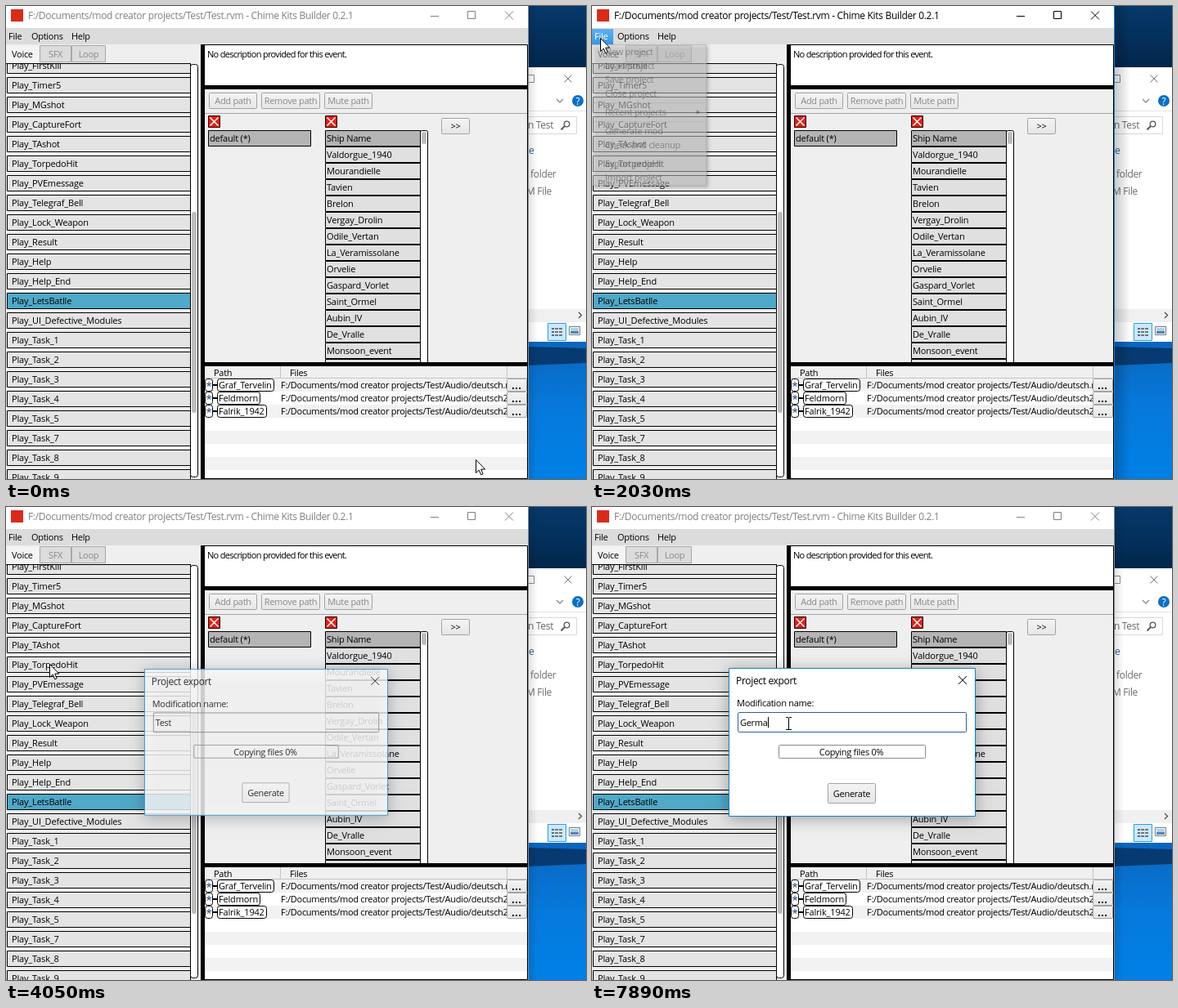
An HTML page with a canvas for the animation above (8 s loop, 709 by 579 pixels).

```html
<!DOCTYPE html>
<html lang="en">
<head>
<meta charset="utf-8">
<title>Project export</title>
<style>
html, body { margin: 0; width: 100%; height: 100%; overflow: hidden; background: #fff; }
canvas { display: block; }
</style>
</head>
<body>
<canvas id="stage" width="709" height="579"></canvas>
<script>
const ctx = document.getElementById('stage').getContext('2d');
const LOOP = 8000;
const FONT = '"Open Sans", "Noto Sans", sans-serif';

const STYLE = {
  ui: { size: 11, spacing: -0.28 },
  list: { size: 11, spacing: -0.18 },
  note: { size: 11, spacing: -0.68 },
  title: { size: 12, spacing: -0.32 },
  symbol: { size: 13, spacing: 0 }
};

const EVENTS = ['FirstKill', 'Timer5', 'MGshot', 'CaptureFort', 'TAshot', 'TorpedoHit',
  'PVEmessage', 'Telegraf_Bell', 'Lock_Weapon', 'Result', 'Help', 'Help_End', 'LetsBatlle',
  'UI_Defective_Modules', 'Task_1', 'Task_2', 'Task_3', 'Task_4', 'Task_5', 'Task_7',
  'Task_8', 'Task_9'];
const SHIPS = ['Ship Name', 'Valdorgue_1940', 'Mourandielle', 'Tavien', 'Brelon',
  'Vergay_Drolin', 'Odile_Vertan', 'La_Veramissolane', 'Orvelie', 'Gaspard_Vorlet',
  'Saint_Ormel', 'Aubin_IV', 'De_Vralle', 'Monsoon_event', 'Rivage'];
const PATHS = [['Graf_Tervelin', 'deutsch.mp3'], ['Feldmorn', 'deutsch2.mp3'], ['Falrik_1942', 'deutsch2.mp3']];
const MENU = [['New project', 56], ['Load project', 73], ['Save project', 90], ['Close project', 107],
  ['Recent projects', 130], ['Generate mod', 153], ['Check and cleanup', 170],
  ['Export project', 193], ['Import project', 210]];

// Pointer moves: the pointer jumps to the next point at each listed time.
const MOVES = [
  { times: [200, 400, 610, 820, 1020, 1230], from: [574, 555], to: [18, 57] },
  { times: [1430, 1630], from: [18, 57], to: [10, 39] },
  { times: [2640], from: [10, 39], to: [13, 52] },
  { times: [2840, 3040, 3240], from: [13, 52], to: [53, 192] },
  { times: [4250, 4450, 4660, 4860, 5070], from: [53, 192], to: [240, 265] }
];
const TYPED = [[7890, 'Germa'], [7700, 'Germ'], [7510, 'Ge'], [7090, 'G'], [0, 'Test']];

function fill(x, y, w, h, color) {
  ctx.fillStyle = color;
  ctx.fillRect(x, y, w, h);
}

function box(x, y, w, h, color, border, radius = 0) {
  ctx.beginPath();
  ctx.roundRect(x + 0.5, y + 0.5, w - 1, h - 1, radius);
  ctx.fillStyle = color;
  ctx.fill();
  ctx.lineWidth = 1;
  ctx.strokeStyle = border;
  ctx.stroke();
}

function setFont({ size, spacing }) {
  ctx.font = `${size}px ${FONT}`;
  ctx.letterSpacing = `${spacing}px`;
}

function text(str, x, y, color = '#000', style = STYLE.ui, align = 'left') {
  setFont(style);
  ctx.textAlign = align;
  ctx.fillStyle = color;
  ctx.fillText(str, x, y);
}

function line(color, width, ...pts) {
  ctx.beginPath();
  pts.forEach(([x, y]) => ctx.lineTo(x, y));
  ctx.strokeStyle = color;
  ctx.lineWidth = width;
  ctx.stroke();
}

function cross(x, y, size, color, width = 1) {
  line(color, width, [x, y], [x + size, y + size]);
  line(color, width, [x + size, y], [x, y + size]);
}

function clipped(x, y, w, h, draw) {
  ctx.save();
  ctx.beginPath();
  ctx.rect(x, y, w, h);
  ctx.clip();
  draw();
  ctx.restore();
}

function gradient(y0, y1, ...colors) {
  const g = ctx.createLinearGradient(0, y0, 0, y1);
  colors.forEach((c, i) => g.addColorStop(i / (colors.length - 1), c));
  return g;
}

function castShadow(alpha, blur, dx, dy) {
  ctx.shadowColor = `rgba(0,0,0,${alpha})`;
  ctx.shadowBlur = blur;
  ctx.shadowOffsetX = dx;
  ctx.shadowOffsetY = dy;
}

function button(label, x, y, w, h, color = '#000') {
  box(x, y, w, h, gradient(y, y + h, '#f4f4f4', '#e6e6e6'), '#a3a3a3', 1);
  text(label, x + w / 2, y + h / 2 + 4, color, STYLE.ui, 'center');
}

function desktop(active) {
  fill(638, 0, 71, 76, gradient(0, 76, '#06396a', '#04305c', '#02264b'));
  fill(638, 410, 71, 169, gradient(410, 579, '#0a66bd', '#0679dc', '#0080e6'));
  ctx.beginPath();
  [[638, 417], [709, 419], [709, 437], [638, 440]].forEach(p => ctx.lineTo(...p));
  ctx.fillStyle = '#063a70';
  ctx.fill();

  fill(638, 75, 71, 336, '#fff');
  box(635, 84, 11, 10, '#fff', '#8a8a8a');
  cross(682.5, 84.5, 9, '#777');
  line('#8a8a8a', 1.3, [673, 114], [677, 118], [681, 114]);
  ctx.beginPath();
  ctx.arc(699, 116, 7, 0, 7);
  ctx.fillStyle = '#0a70c4';
  ctx.fill();
  text('?', 699, 120.5, '#fff', { size: 12, spacing: 0 }, 'center');
  fill(638, 128, 71, 1, '#e2e2e2');
  box(630, 135, 68, 22, '#fff', '#d9d9d9');
  text('n Test', 638, 150, '#666', STYLE.title);
  ctx.beginPath();
  ctx.arc(685.5, 144.5, 3.3, 0, 7);
  ctx.strokeStyle = '#555';
  ctx.lineWidth = 1.3;
  ctx.stroke();
  line('#555', 1.8, [683, 147], [678.5, 151.5]);
  text('e', 639, 181, '#2b5c94', STYLE.title);
  text('folder', 641, 210, '#6d6d6d', STYLE.title);
  text('M File', 636, 231, '#6d6d6d', STYLE.title);
  fill(638, 371, 71, 16, '#f0f0f0');
  line('#555', 1.4, [700, 375], [703.5, 378.5], [700, 382]);
  box(662, 388, 23, 22, '#cce8ff', '#26a0da');
  for (let y = 394; y < 406; y += 4) {
    fill(667, y, 3, 2, '#4a6f90');
    fill(671, y, 4, 2, '#777');
    fill(676, y, 4, 2, '#777');
  }
  box(688, 392, 14, 11, '#fff', '#777');
  fill(690, 398, 10, 3, '#4c86b5');
  fill(690, 394, 10, 4, '#a9d2ee');

  const shade = ctx.createLinearGradient(638, 0, active ? 658 : 650, 0);
  shade.addColorStop(0, `rgba(0,0,0,${active ? 0.22 : 0.12})`);
  shade.addColorStop(1, 'rgba(0,0,0,0)');
  fill(638, 0, 22, 579, shade);
}

function titleBar(active) {
  const ink = active ? '#000' : '#808080';
  fill(0, 0, 638, 28, '#fff');
  fill(6, 4, 15, 15, '#d92b1c');
  text('F:/Documents/mod creator projects/Test/Test.rvm - Chime Kits Builder 0.2.1',
    27, 16, ink, STYLE.title);
  fill(519, 12, 10, 1, ink);
  box(564, 6, 10, 10, '#fff', ink);
  cross(610, 6.5, 10, ink);
}

function menuBar(open) {
  fill(0, 27, 638, 20, '#dcdcdc');
  if (open) fill(0, 28, 26, 19, gradient(28, 47, '#5fb0f0', '#3d96e0'));
  text('File', 3, 41, open ? '#fff' : '#000');
  text('Options', 31, 41);
  text('Help', 80, 41);
}

function eventPanel() {
  fill(0, 47, 238, 532, '#efefef');
  box(0, 48, 41, 23, '#f4f4f4', '#efefef');
  text('Voice', 7, 63);
  [['SFX', 41, 39], ['Loop', 80, 42]].forEach(([label, x, w]) => {
    box(x, 48, w, 21, '#dcdcdc', '#a8a8a8');
    text(label, x + w / 2, 63, '#8a8a8a', STYLE.ui, 'center');
  });
  clipped(0, 70, 226, 509, () => {
    EVENTS.forEach((name, i) => {
      const y = 63 + i * 24;
      box(1, y, 225, 20, name === 'LetsBatlle' ? '#50a9c8' : '#e4e4e4', '#000');
      text('Play_' + name, 7, y + 14, '#000', STYLE.list);
    });
    fill(0, 70, 226, 1, '#000');
  });
  box(225, 71, 10, 506, '#fff', '#000', 3);
  ctx.beginPath();
  ctx.roundRect(227, 252, 6, 246, 3);
  ctx.fillStyle = '#bdbdbd';
  ctx.fill();
}

function removeIcon(x) {
  box(x, 134, 15, 15, '#dc2118', '#300');
  cross(x + 2.5, 136.5, 10, '#fff', 1.5);
}

function shipPanel() {
  fill(242, 47, 396, 50, '#fff');
  text('No description provided for this event.', 246, 63, '#000', STYLE.note);
  fill(242, 101, 396, 335, '#efefef');
  button('Add path', 248, 106, 59, 20, '#888');
  button('Remove path', 312, 106, 72, 20, '#888');
  button('Mute path', 389, 106, 59, 20, '#888');
  fill(242, 131, 396, 1, '#a5a5a5');
  removeIcon(247);
  removeIcon(390);
  box(247, 152, 126, 20, '#b4b4b4', '#000');
  text('default (*)', 249, 166, '#000', STYLE.list);
  button('>>', 532, 137, 35, 20);
  clipped(380, 150, 150, 286, () => {
    box(506, 152, 10, 300, '#fff', '#000', 2);
    SHIPS.forEach((name, i) => {
      const y = 152 + i * 20;
      box(390, y, 117, 20, i ? '#e0e0e0' : '#b4b4b4', '#000');
      text(name, 392, y + 14, '#000', STYLE.list);
    });
    ctx.beginPath();
    ctx.roundRect(508, 154, 6, 15, 3);
    ctx.fillStyle = '#bdbdbd';
    ctx.fill();
  });
}

function pathTable() {
  fill(242, 440, 396, 139, '#fff');
  for (let y = 456; y < 579; y += 32) fill(242, y, 396, 16, '#f2f2f2');
  fill(242, 440, 396, 15, '#f0f0f0');
  fill(242, 455, 396, 1, '#c4c4c4');
  fill(335, 441, 1, 14, '#c4c4c4');
  fill(612, 441, 1, 14, '#c4c4c4');
  text('Path', 254, 453);
  text('Files', 347, 453);
  PATHS.forEach(([name, file], i) => {
    const y = 456 + i * 16;
    setFont(STYLE.list);
    const w = Math.round(ctx.measureText(name).width) + 5;
    fill(252, y + 7, 7, 2, '#000');
    box(243, y, 10, 16, '#fff', '#000', 3);
    text('*', 248, y + 14, '#123f78', STYLE.symbol, 'center');
    box(258, y, w, 16, '#fff', '#000', 3);
    text(name, 260, y + 12, '#000', STYLE.list);
    clipped(336, y, 276, 16, () =>
      text('F:/Documents/mod creator projects/Test/Audio/' + file, 336, y + 12));
    button('', 612, y, 25, 16);
    [619, 623, 627].forEach(x => fill(x, y + 11, 2, 2, '#000'));
  });
}

function dividers() {
  fill(238, 47, 5, 532, '#000');
  fill(238, 97, 400, 5, '#000');
  fill(238, 436, 400, 5, '#000');
  line('#000', 1, [242, 47.5], [637.5, 47.5], [637.5, 578.5], [242, 578.5]);
}

function fileMenu(pointerY, alpha) {
  ctx.save();
  ctx.globalAlpha = alpha;
  castShadow(0.45, 4, 2, 2);
  fill(0, 47, 140, 173, '#dcdcdc');
  castShadow(0, 0, 0, 0);
  box(-1, 47, 141, 173, 'transparent', '#a0a0a0');
  [118, 141, 181].forEach(y => fill(2, y, 136, 1, '#aaa'));
  MENU.forEach(([label, y]) => {
    const hot = Math.abs(pointerY - y) <= 8.5;
    if (hot) fill(0, y - 8, 139, 17, gradient(y - 8, y + 9, '#6cbaf2', '#3c96e0'));
    text(label, 16, y + 4, hot ? '#fff' : '#444');
  });
  ctx.beginPath();
  [[128, 127.5], [132, 130], [128, 132.5]].forEach(p => ctx.lineTo(...p));
  ctx.fillStyle = '#333';
  ctx.fill();
  ctx.restore();
}

function nameField(t) {
  const focused = t >= 6480;
  const value = TYPED.find(([start]) => t >= start)[1];
  box(178, 251, 280, 25, 'transparent', focused ? '#2f609c' : '#7f7f7f', 1);
  setFont(STYLE.ui);
  const width = Math.round(ctx.measureText(value).width);
  const selected = focused && t < 7090;
  if (selected) fill(181, 257, width + 1, 13, '#0078d7');
  text(value, 181, 268, selected ? '#fff' : '#000');
  if (focused && !selected) fill(181 + width, 257, 1, 13, '#000');
}

function dialog(t) {
  const opening = t < 4250;
  ctx.save();
  if (opening) {
    ctx.globalAlpha = 0.8;
    ctx.translate(318, 288);
    ctx.scale(0.987, 0.987);
    ctx.translate(-318, -288);
  }
  castShadow(0.32, 18, 0, 3);
  fill(167, 197, 302, 182, '#fff');
  castShadow(0, 0, 0, 0);
  box(167, 197, 302, 182, 'transparent', '#1a7fc4');
  text('Project export', 176, 217, '#000', STYLE.title);
  cross(448, 207, 10, '#000');
  text('Modification name:', 177, 244);
  nameField(t);
  box(228, 291, 180, 17, 'transparent', '#8a8a8a', 1);
  text('Copying files 0%', 317, 304, '#000', STYLE.ui, 'center');
  button('Generate', 288, 338, 59, 25);
  ctx.restore();
}

function pointerAt(t) {
  let pos = MOVES[0].from;
  for (const { times, from, to } of MOVES) {
    const done = times.filter(time => t >= time).length;
    if (!done) break;
    const k = done / times.length;
    const eased = times.length > 2 ? k * k * (3 - 2 * k) : k;
    pos = from.map((v, i) => Math.round(v + (to[i] - v) * eased));
  }
  return pos;
}

function arrow(x, y) {
  ctx.beginPath();
  [[0, 0], [0, 16], [3.7, 12.6], [6.2, 18.3], [8.6, 17.3], [6.2, 11.6], [11.2, 11.6]]
    .forEach(([dx, dy]) => ctx.lineTo(x + 0.5 + dx, y + 0.5 + dy));
  ctx.closePath();
  ctx.fillStyle = '#fff';
  ctx.fill();
  ctx.strokeStyle = '#000';
  ctx.lineWidth = 1;
  ctx.stroke();
}

function beam(x, y) {
  fill(x, y - 7, 1, 15, '#000');
  [y - 8, y + 7].forEach(end => {
    fill(x - 3, end, 3, 1, '#000');
    fill(x + 1, end, 3, 1, '#000');
  });
}

function draw(t) {
  const menuOpen = t >= 2030 && t < 4050;
  const [x, y] = pointerAt(t);
  desktop(menuOpen);
  titleBar(menuOpen);
  menuBar(menuOpen);
  eventPanel();
  shipPanel();
  pathTable();
  dividers();
  fill(638, 0, 1, 579, menuOpen ? '#1883d7' : '#8a8f96');
  if (menuOpen) fileMenu(y, t < 2220 ? 0.5 : 1);
  if (t >= 4050) dialog(t);
  const overField = t >= 4250 && x > 178 && x < 458 && y > 251 && y < 276;
  (overField ? beam : arrow)(x, y);
}

const start = performance.now();
function tick() {
  draw((performance.now() - start) % LOOP);
  requestAnimationFrame(tick);
}
tick();
</script>
</body>
</html>
```
